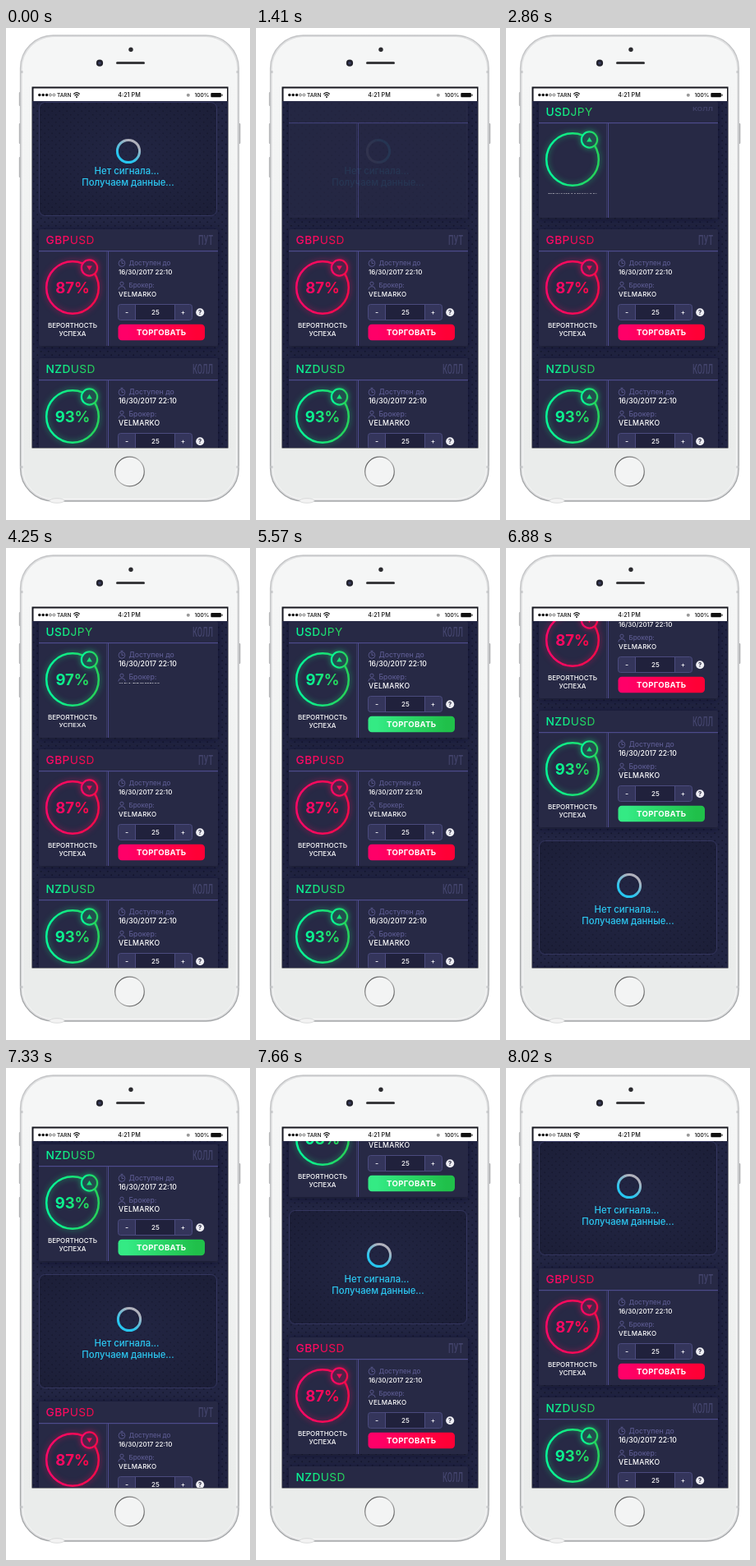
These frames come from a looping animation (297x599 px, 8.25 s). An HTML page:

```html
<!DOCTYPE html>
<html lang="ru">
<head>
<meta charset="utf-8">
<title>Trading signals</title>
<style>
html, body { margin: 0; width: 100%; height: 100%; overflow: hidden; background: #fff; }
svg { display: block; width: 297px; height: 599px; font-family: Inter, "Noto Sans", sans-serif; }
.tag { font-family: Roboto, "Noto Sans", sans-serif; font-weight: 500; }
.wide { letter-spacing: .03em; }
.glow { filter: drop-shadow(0 0 3.5px var(--glow)); }
</style>
</head>
<body>
<svg id="stage" viewBox="0 0 297 599" xmlns="http://www.w3.org/2000/svg"></svg>
<script>
const LOOP = 8250, TICK = 30;
const SET = 470;                 // distance between the two copies of the feed
const SCROLL = [6010, 8020, 471];
const CARD = '#272945', DIM = '#5c5b91', LINE = '#4d4b8c';

const UP = { color: '#12e676', ink: 'url(#mint)', grad: 'go', tag: 'КОЛЛ', arrow: 'M-3.4 2.4H3.4L0 -3Z', size: 8.7 };
const DOWN = { color: '#fb0a57', ink: 'url(#rose)', grad: 'stop', tag: 'ПУТ', arrow: 'M-3.4 -2.4H3.4L0 3Z', size: 8 };
const PAIRS = {
  usd: { ...UP, pair: ['USD', 'JPY'], odds: '97%' },
  gbp: { ...DOWN, pair: ['GBP', 'USD'], odds: '87%' },
  nzd: { ...UP, pair: ['NZD', 'USD'], odds: '93%' }
};

// start, end of each part growing open in the new card
const GROW = {
  pair: [2520, 2770], tag: [2740, 3010], odds: [3180, 3480],
  until: [3450, 3720], date: [3690, 4010], chance: [3840, 4100],
  broker: [4010, 4250], success: [4070, 4300], name: [4220, 4480],
  amount: [4450, 4770], button: [4970, 5570]
};

const text = (x, y, s, size, fill, weight = 500, anchor = 'start', extra = '') =>
  `<text x="${x}" y="${y + size * 0.36}" font-size="${size}" fill="${fill}" font-weight="${weight}" text-anchor="${anchor}" ${extra}>${s}</text>`;
const rect = (x, y, w, h, rx, fill, extra = '') =>
  `<rect x="${x}" y="${y}" width="${w}" height="${h}" rx="${rx}" fill="${fill}" ${extra}/>`;
const circle = (x, y, r, fill, stroke = 'none', w = 1) =>
  `<circle cx="${x}" cy="${y}" r="${r}" fill="${fill}" stroke="${stroke}" stroke-width="${w}"/>`;
const path = (d, stroke, w = 1, fill = 'none') =>
  `<path d="${d}" fill="${fill}" stroke="${stroke}" stroke-width="${w}" stroke-linecap="round"/>`;

function ring(p, live) {
  return `<g ${live ? 'id="ring"' : ''} transform="translate(81 71)">
    <g class="glow" style="--glow:${p.color}99">
      ${circle(0, 0, 31.8, 'none', p.ink, 2.5)}
      ${circle(20.5, -24, 9.6, CARD, p.ink, 2.2)}
    </g>
    ${circle(20.5, -24, 8.5, p.color + '33')}
    <path d="${p.arrow}" transform="translate(20.5 -24)" fill="${p.color}"/>
  </g>`;
}

function amount() {
  return rect(136.5, 91.5, 90, 19, 3, '#34355b') +
    rect(157, 91.5, 48, 19, 0, '#20213c') +
    rect(136.5, 91.5, 90, 19, 3, 'none', 'stroke="#4b4b7e"') +
    path('M157.5 92V110M205.5 92V110', '#4b4b7e') +
    text(147, 100.5, '-', 9, '#fff', 500, 'middle') +
    text(182, 101, '25', 8, '#fff', 500, 'middle') +
    text(215.5, 101, '+', 8, '#fff', 500, 'middle') +
    circle(236.2, 101.2, 5, '#eeeef4') +
    text(236.2, 101.3, '?', 7.5, '#25263f', 700, 'middle');
}

function card(top, p, live = false) {
  const part = (id, y, body) => live ? `<g data-part="${id}" data-y="${y}">${body}</g>` : body;
  const clock = circle(141, 41.5, 3.9, 'none', DIM, 0.9) + path('M141 39V41.5H143M140 36.3H142', DIM, 0.9);
  const person = circle(141, 66.2, 2.1, 'none', DIM, 0.9) + path('M136.8 73Q137 69.6 141 69.6T145.2 73', DIM, 0.9);
  return `<g ${live ? 'id="live" opacity="0"' : ''} transform="translate(0 ${top})">
    ${rect(40, 1, 218, 143, 2, '#0d0d20', 'opacity=".55" filter="url(#soft)"')}
    ${rect(40, 0, 218, 142, 2, CARD)}
    ${rect(40, 26, 218, 1.2, 0, LINE)}
    ${rect(122, 27, 1, 115, 0, '#393963')}
    ${rect(124, 27, 1, 115, 0, LINE)}
    ${part('pair', 7, text(48.5, 13, `${p.pair[0]}<tspan font-weight="400">${p.pair[1]}</tspan>`, 13.7, p.ink, 500, 'start', 'class="wide"'))}
    ${part('tag', 7, `<g transform="translate(252 13) scale(1 1.7)">${text(0, 0, p.tag, 9.2, '#43446c', 500, 'end', 'class="tag"')}</g>`)}
    ${ring(p, live)}
    ${part('odds', 64, text(81, 71, p.odds, 18.5, p.ink, 700, 'middle'))}
    ${part('chance', 112.5, text(81, 117, 'ВЕРОЯТНОСТЬ', 8, '#fff', 500, 'middle'))}
    ${part('success', 124, text(81, 127, 'УСПЕХА', 8, '#fff', 500, 'middle'))}
    ${part('until', 36, clock + text(149.5, 41, 'Доступен до', p.size, DIM, 500))}
    ${part('date', 48, text(137, 52, '16/30/2017 22:10', p.size, '#fff', 500))}
    ${part('broker', 63, person + text(149.5, 68.3, 'Брокер:', p.size, DIM, 500))}
    ${part('name', 75, text(137, 79.3, 'VELMARKO', p.size, '#fff', 500, 'start', 'class="wide"'))}
    ${part('amount', 91, amount())}
    ${part('button', 115.5, rect(136.5, 115.8, 105.5, 19.4, 4.5, `url(#${p.grad})`) +
      text(189.3, 125.5, 'ТОРГОВАТЬ', 9.6, '#fff', 700, 'middle', 'class="wide"'))}
  </g>`;
}

function loader(top, spinner, id = '') {
  return `<g ${id && `id="${id}"`} transform="translate(0 ${top})">
    ${rect(40.5, 0.5, 216, 138, 7, '#20233f')}
    ${rect(40.5, 0.5, 216, 138, 7, 'url(#dots)')}
    ${rect(40.5, 0.5, 216, 138, 7, 'url(#shade)', 'stroke="#34365f"')}
    ${spinner}
    ${text(147, 83.5, 'Нет сигнала...', 11.4, '#2cc8f2', 500, 'middle')}
    ${text(148.5, 98, 'Получаем данные...', 11.3, '#2cc8f2', 500, 'middle')}
  </g>`;
}

const wheel = (x, y, id = '') =>
  `<g ${id && `id="${id}"`} transform="translate(${x} ${y})">${circle(0, 0, 13.6, 'none', 'url(#tail)', 3)}</g>`;

const grad = (id, a, b, pos = '') =>
  `<linearGradient id="${id}" ${pos}><stop offset=".1" stop-color="${a}"/><stop offset=".9" stop-color="${b}"/></linearGradient>`;

const defs = `<defs>
  <pattern id="dots" width="9" height="9" patternUnits="userSpaceOnUse">
    ${circle(2.2, 2.2, 1, '#16182f')}${circle(6.7, 6.7, 1, '#16182f')}
  </pattern>
  <radialGradient id="shade" r=".65">
    <stop offset="0" stop-color="#262b4c" stop-opacity=".35"/><stop offset="1" stop-color="#15172c" stop-opacity=".35"/>
  </radialGradient>
  ${grad('go', '#34ea84', '#20c04a')}
  ${grad('stop', '#ff0068', '#ff0036')}
  ${grad('mint', '#08f797', '#25d45c')}
  ${grad('rose', '#ff0866', '#f60a4c')}
  ${grad('tail', '#b0b1bc', '#27c6f0', 'gradientUnits="userSpaceOnUse" x1="7" y1="-11" x2="-5" y2="9"')}
  ${grad('body', '#f5f6f6', '#eaeceb', 'x2="0" y2="1"')}
  ${grad('edge', '#c3c4c6', '#a4a6a8', 'x2="0" y2="1"')}
  <linearGradient id="home" x2="1" y2="1">
    <stop offset=".1" stop-color="#555"/><stop offset=".5" stop-color="#bbb"/><stop offset=".9" stop-color="#555"/>
  </linearGradient>
  <filter id="soft" x="-10%" y="-10%" width="120%" height="125%"><feGaussianBlur stdDeviation="4"/></filter>
  <clipPath id="view"><rect x="32" y="89" width="238" height="422"/></clipPath>
</defs>`;

function phone() {
  const keys = [[15.8, 78, 17], [15.8, 116, 25], [15.8, 157, 25], [283, 116, 25]]
    .map(([x, y, h]) => rect(x, y, 2.4, h, 1, '#b4b5b7')).join('');
  const bands = [52, 533].map(y => rect(17.5, y, 3, 3, 0, '#c8c9cb') + rect(280.5, y, 3, 3, 0, '#c8c9cb')).join('');
  return keys +
    rect(17.5, 9, 265.8, 567, 40, '#dfe0e1', 'stroke="url(#edge)" stroke-width="1.3"') +
    rect(20.3, 11.6, 260.2, 561.8, 37.5, 'url(#body)', 'stroke="#f9f9f9"') +
    bands +
    `<ellipse cx="62" cy="575.5" rx="9" ry="2.8" fill="#f3f3f3" stroke="#d2d3d4" stroke-width=".8"/>` +
    circle(152, 26.3, 2.7, '#2c2c30') +
    circle(114, 42.7, 4.1, '#22222c') + circle(114, 42.7, 1.8, '#3a3f60') +
    rect(134, 41.1, 35, 3, 1.5, '#39393c') +
    circle(150.5, 540, 17.8, '#f3f4f4', 'url(#home)', 1.2) +
    rect(31.5, 71.5, 239, 440, 0, '#16161f');
}

function statusBar() {
  const signal = [0, 1, 2, 3, 4].map(i =>
    circle(40.8 + i * 4.4, 81.5, i < 3 ? 1.7 : 1.4, i < 3 ? '#111' : '#fff', '#111', i < 3 ? 0 : 0.6)).join('');
  return rect(33.5, 73.5, 235.5, 15.5, 0, '#fff') + signal +
    text(62, 81.7, 'TARN', 6.5, '#111', 500) +
    path('M82.6 80.2Q86 77 89.4 80.2M84 82Q86 80.2 88 82', '#111', 1.2) + circle(86, 84, 1, '#111') +
    text(150, 81.7, '4:21 PM', 7.2, '#111', 500, 'middle') +
    circle(221.8, 81.7, 2, '#999') +
    text(229.5, 81.7, '100%', 6.6, '#111', 500) +
    rect(249.3, 79, 12.6, 5.2, 1, '#111') + rect(262.4, 80.4, 1.2, 2.4, 0.5, '#111');
}

const stage = document.getElementById('stage');
stage.innerHTML = defs + phone() +
  `<g clip-path="url(#view)"><g id="feed">
    ${rect(32, 80, 238, 920, 0, '#222543')}${rect(32, 80, 238, 920, 0, 'url(#dots)')}
    ${card(245, PAIRS.gbp)}${card(402, PAIRS.nzd)}
    ${loader(90 + SET, wheel(150, 55))}${card(245 + SET, PAIRS.gbp)}${card(402 + SET, PAIRS.nzd)}
    ${loader(90, wheel(149, 60, 'spin'), 'wait')}${card(89, PAIRS.usd, true)}
  </g></g>` + statusBar();

const el = id => document.getElementById(id);
const feed = el('feed'), wait = el('wait'), spin = el('spin'), live = el('live'), ringEl = el('ring');
const parts = [...document.querySelectorAll('[data-part]')];
const span = (t, a, b) => Math.min(1, Math.max(0, (t - a) / (b - a)));
const mix = (a, b, k) => a + (b - a) * k;
const easeOut = k => 1 - (1 - k) ** 3;

function draw(t) {
  const step = Math.floor(t / TICK);
  spin.setAttribute('transform', `translate(149 60) rotate(${step * 360 / 29})`);

  const swap = span(t, 840, 1650);
  wait.setAttribute('opacity', 1 - swap);
  live.setAttribute('opacity', swap);

  // the ring shrinks from screen size into its place
  const fly = span(t, 1680, 2520), k = easeOut(fly);
  ringEl.setAttribute('transform', `translate(${mix(156, 81, k)} ${mix(61, 71, k)}) scale(${mix(3.3, 1, k)})`);
  ringEl.setAttribute('opacity', Math.min(1, fly * 2));

  for (const g of parts) {
    const id = g.dataset.part, y = +g.dataset.y;
    let s = span(t, ...GROW[id]);
    if (id === 'chance' && t >= 2490) s = Math.max(s, 0.1);
    g.setAttribute('transform', `translate(0 ${y * (1 - s)}) scale(1 ${s})`);
    g.setAttribute('visibility', s > 0 ? 'visible' : 'hidden');
  }

  const [from, to, dist] = SCROLL;
  const shift = Math.floor((Math.min(Math.max(t, from), to) - from) / TICK) * dist * TICK / (to - from);
  feed.setAttribute('transform', `translate(0 ${-Math.round(shift)})`);
}

const start = performance.now();
function frame() {
  draw((performance.now() - start) % LOOP);
  requestAnimationFrame(frame);
}
draw(0);
requestAnimationFrame(frame);
</script>
</body>
</html>
```
